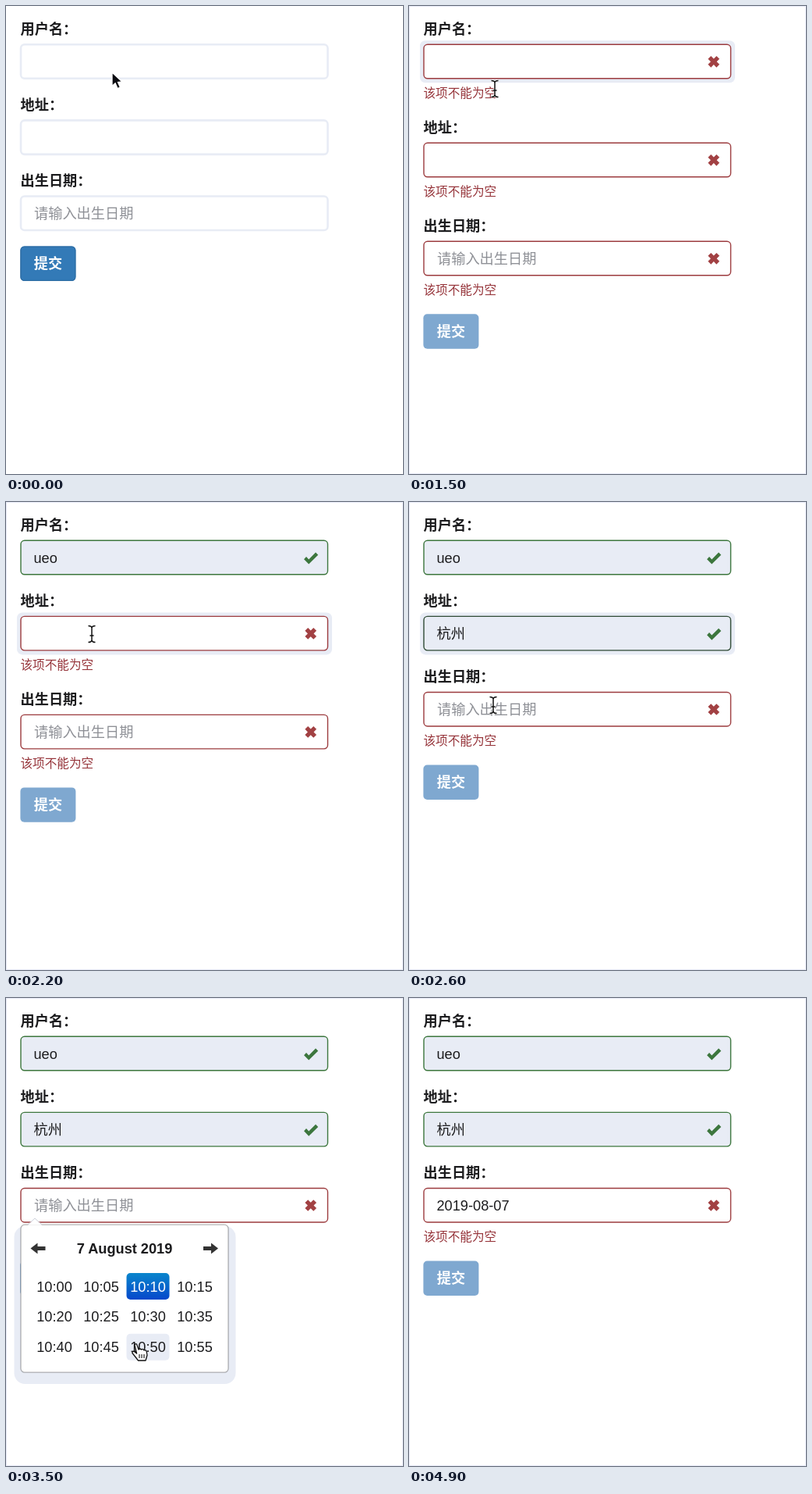
Animation of 509 by 599 pixels, one loop 5 s. Source, as an HTML page:

```html
<!DOCTYPE html>
<html lang="zh-CN">
<head>
<meta charset="utf-8">
<title>表单校验</title>
<style>
  html, body { margin: 0; width: 100%; height: 100%; overflow: hidden; background: #fff; }
  svg { display: block; width: 509px; height: 599px; }
  text { font: 18.2px "Liberation Sans", "Noto Sans CJK SC", "Noto Sans CJK", sans-serif; fill: #1c1c1e; }
  .bold { font-weight: 600; }
  .hint { fill: #8e9096; }
  .help { font-size: 15.6px; fill: #96343a; }
  .white { fill: #fff; }
  .old { fill: #999; }
  .shade { mix-blend-mode: multiply; }
</style>
</head>
<body>
<svg id="stage" viewBox="0 0 509 599">
  <defs>
    <linearGradient id="blue" x2="0" y2="1">
      <stop stop-color="#0a86cc"/><stop offset="1" stop-color="#0648cb"/>
    </linearGradient>
  </defs>
  <g id="view"></g>
</svg>
<script>
const LOOP = 5000, STEP = 100;
const PALE = '#e8ecf5', RED = '#9c3b3e', GREEN = '#3c763d';
const view = document.getElementById('view');

// Moments at which the form changes
const AT = { errors: 700, name: 1700, city: 2500, popup: 2800, hours: 3300, minutes: 3500, done: 3800 };

// Pointer path: time, x, y of the hot spot, shape from then on
const POINTER = [
  [0, 136, 85, 'arrow'], [400, 56, 328, 'hand'], [600, 56, 328, 'arrow'],
  [800, 104, 165, 'arrow'], [900, 115, 106, 'arrow'], [1100, 110, 76, 'beam'],
  [1400, 110, 76, 'beam'], [1700, 110, 166, 'beam'], [1800, 110, 169, 'beam'],
  [2200, 110, 169, 'beam'], [2500, 108, 258, 'beam'], [2600, 108, 260, 'beam'],
  [2800, 108, 262, 'beam'], [2900, 122, 320, 'arrow'], [3000, 148, 400, 'hand'],
  [3100, 157, 423, 'hand'], [3200, 157, 423, 'hand'], [3400, 167, 443, 'hand'],
  [3800, 167, 443, 'arrow'], [4100, 215, 430, 'arrow'], [4400, 310, 450, 'arrow'],
  [4800, 430, 599, 'arrow']
];

const rect = (x, y, w, h, r, style) =>
  `<rect x="${x}" y="${y}" width="${w}" height="${h}" rx="${r}" ${style}/>`;
const text = (s, x, y, cls = '', anchor = 'start') =>
  `<text x="${x}" y="${y + 6.5}" class="${cls}" text-anchor="${anchor}">${s}</text>`;
const mid = (s, x, y, cls) => text(s, x, y, cls, 'middle');
const path = (d, x, y, style) => `<path transform="translate(${x} ${y})" d="${d}" ${style}/>`;

const cross = (y, color) =>
  `<path transform="translate(390.7 ${y}) rotate(45)" fill="${color}"
    d="M-2.7-7.7h5.4v5h5v5.4h-5v5h-5.4v-5h-5v-5.4h5z"/>`;
const check = (y, color) => path('M-9 1.4L-6-1.8-2.8 1.6 6-7.2 9.2-4-2.8 7.8z', 391, y, `fill="${color}"`);
const arrow = (x, y, dir) =>
  `<path transform="translate(${x} ${y}) scale(${dir} 1)" fill="#333"
    d="M9.5 0L.5-7v4.4h-10v5.2h10V7z"/>`;

function field(f, y) {
  const width = f.state ? 1.4 : 2.6;
  const color = f.border || { bad: RED, good: GREEN }[f.state] || PALE;
  let out = text(f.label, 18.5, y - 20, 'bold');
  if (f.glow) out += rect(19 - f.glow, y - f.glow, 394 + 2 * f.glow, 44 + 2 * f.glow, 7, `fill="${PALE}"`);
  out += rect(19, y, 393.5, 43.5, 4.8,
    `fill="${f.state === 'good' ? PALE : '#fff'}" stroke="${color}" stroke-width="${width}"`);
  out += f.value ? text(f.value, 35.5, y + 22, f.cls) : f.hint ? text(f.hint, 36, y + 22, 'hint') : '';
  if (f.caret) out += rect(66, y + 12, 1.2, 20, 0, 'fill="#111"');
  if (f.state === 'bad') out += cross(y + 22, '#a24143') + text('该项不能为空', 18.5, y + 61, 'help');
  if (f.state === 'good') out += check(y + 22.5, f.icon || GREEN);
  return out;
}

function form(t) {
  const bad = t >= AT.errors;
  const state = time => !bad ? '' : t >= time ? 'good' : 'bad';
  const fade = (start, mixed) => t >= start && t < start + 200 ? mixed : '';
  const fields = [
    { label: '用户名：', state: state(AT.name), value: t >= AT.name && 'ueo',
      border: fade(AT.name, '#4a4632'), icon: fade(AT.name, '#4b4b48'),
      glow: bad && t < 2000 ? 5 : 0, caret: t >= AT.name && t < 2000 },
    { label: '地址：', state: state(AT.city), value: t >= AT.city && '杭州',
      border: fade(AT.city, '#2f4a35'), glow: t >= 2000 && t < AT.popup ? 5 : 0 },
    { label: '出生日期：', state: state(Infinity), hint: '请输入出生日期',
      value: t >= AT.done && '2019-08-07', glow: t >= AT.popup && t < 3200 ? 3 : 0 }
  ];
  let y = 49.3, out = '';
  for (const f of fields) {
    out += field(f, y);
    y += f.state === 'bad' ? 126 : 97.1;
  }
  y -= 33;
  out += rect(18.4, y, 71, 44.4, 5, `fill="${bad ? '#7fa8d0' : '#337ab7'}"`);
  if (!bad) out += rect(19, y + .6, 69.8, 43.2, 4.6, 'fill="none" stroke="#2e6da4" stroke-width="1.3"');
  return out + text('提交', 35.7, y + 22.2, 'white bold');
}

const panel = (w, h) =>
  rect(10.5, 292, w + 18, h + 13, 14, `class="shade" fill="${PALE}"`) +
  rect(19, 290.2, w, h, 5, 'fill="#fff" stroke="#000" stroke-opacity=".3" stroke-width="1.3"') +
  path('M-9 0.8L0-8 9 0.8z', 37, 290, 'fill="#fff"') +
  path('M-9 0L0-8 9 0', 37, 290, `fill="none" stroke="#ccd0da" stroke-width="1"`);

const head = (title, x, y, left, right) =>
  mid(title, x, y, 'bold') + arrow(left, y + .5, -1) + arrow(right, y + .5, 1);

function cell(s, x, y, w, h, { on, hover, old } = {}) {
  const fill = on ? 'url(#blue)' : hover ? PALE : '';
  return (fill ? rect(x - w / 2, y - h / 2, w, h, 5, `fill="${fill}"`) : '') +
    mid(s, x, y, on ? 'white' : old ? 'old' : '');
}

function days() {
  const cols = [43, 83, 121, 158.5, 197, 232.5, 269];
  let out = panel(276, 340) + head('August 2019', 156, 315, 43.5, 269.5);
  ['Su', 'Mo', 'Tu', 'We', 'Th', 'Fr', 'Sa'].forEach((d, i) => out += mid(d, cols[i], 355, 'bold'));
  for (let i = 0; i < 42; i++) {
    const n = i - 3;
    const old = n < 1 || n > 31;
    const label = n < 1 ? n + 31 : n > 31 ? n - 31 : n;
    out += cell(label, cols[i % 7], 394.3 + 39.4 * Math.floor(i / 7), 41.5, 39.4,
      { old, on: n === 12, hover: n === 7 });
  }
  return out;
}

function times(labels, active, hover) {
  const rows = labels.length / 4;
  let out = panel(266, 72 + 39 * rows) + head('7 August 2019', 152, 320, 41, 262.5);
  labels.forEach((s, i) => {
    out += cell(s, 62 + 60 * (i % 4), 369 + 38.9 * Math.floor(i / 4), 55, 34,
      { on: i === active, hover: i === hover });
  });
  return out;
}

const hours = Array.from({ length: 24 }, (_, i) => i + ':00');
const minutes = Array.from({ length: 12 }, (_, i) => '10:' + String(i * 5).padStart(2, '0'));

function popup(t) {
  if (t < AT.popup || t >= AT.done) return '';
  if (t < AT.hours) return days();
  return t < AT.minutes ? times(hours, 10) : times(minutes, 2, 10);
}

const SHAPES = {
  arrow: (x, y) => path('M0 0V17.5L4.1 13.8 7 20.6 10.4 19.1 7.5 12.5 13 12z', x, y,
    'fill="#0b0b10" stroke="#fff" stroke-width="1.3"'),
  beam: (x, y) => ['stroke="#fff" stroke-width="3"', 'stroke="#111" stroke-width="1.5"'].map(s =>
    path('M-4.5-10.5Q-.5-10.5 0-8 .5-10.5 4.5-10.5M0-8V8M-4.5 10.5Q-.5 10.5 0 8 .5 10.5 4.5 10.5M-2.5 2H2.5',
      x, y, `fill="none" ${s}`)).join(''),
  hand: (x, y) => path('M-2 1.5Q-1.5-1 .5 0L3 7Q4.5 5 6.5 7 8.5 5.5 10 8 12.5 7 13.2 9.5L14 14Q13 18 12 21H2.5' +
    'Q1-1.2 1 17L-5 11.5Q-5.5 9 -2.5 9.5L.6 12z', x, y,
    'fill="#fff" stroke="#111" stroke-width="1.3" stroke-linejoin="round"').replace('Q1-1.2 1 17', 'Q1 19 -1 16.5') +
    path('M4 13V18M7 13V18M10 13V18', x, y, 'stroke="#111" stroke-width="1.1"')
};

function pointer(t) {
  const last = POINTER.length - 1;
  if (t >= POINTER[last][0]) return '';
  const i = POINTER.findIndex(p => p[0] > t) - 1;
  const [t0, x0, y0, shape] = POINTER[i];
  const [t1, x1, y1] = POINTER[i + 1];
  const k = (t - t0) / (t1 - t0);
  return SHAPES[shape](x0 + (x1 - x0) * k, y0 + (y1 - y0) * k);
}

function draw(t) {
  const frame = t >= 100 ? rect(.5, .5, 508, 598, 0, 'fill="none" stroke="#e8ebf7"') : '';
  view.innerHTML = form(t) + popup(t) + frame + pointer(t);
}

let shown = -1;
const start = performance.now();
function tick() {
  const t = Math.floor((performance.now() - start) % LOOP / STEP) * STEP;
  if (t !== shown) draw(shown = t);
  requestAnimationFrame(tick);
}
tick();
</script>
</body>
</html>
```
